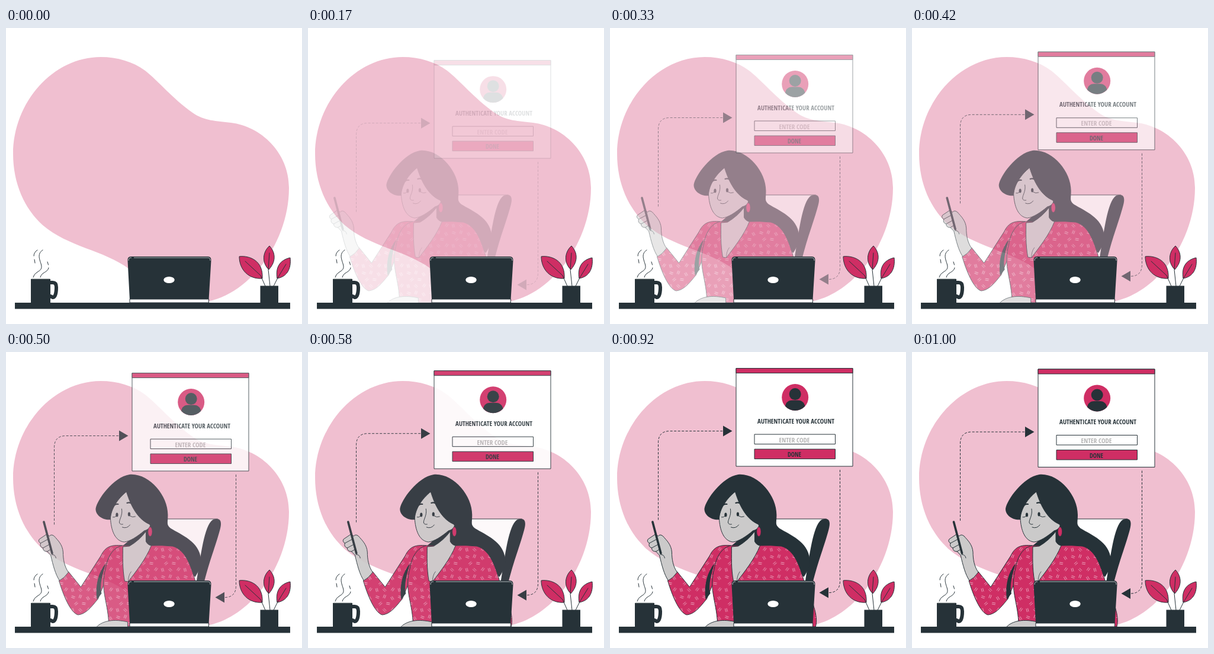
An HTML page for the animation above (1040 ms loop, 500x500 px).

```html
<!DOCTYPE html>
<html lang="en">
<head>
<meta charset="utf-8">
<title>Authenticate your account</title>
<style>
html, body { margin: 0; height: 100%; overflow: hidden; background: #fff }
svg { display: block; width: 100%; height: 100% }
.line { fill: none; stroke: #263238; stroke-linecap: round; stroke-linejoin: round }
.dark { fill: #263238 }
.pink, .skin, .white { stroke: #263238; stroke-linejoin: round }
.pink { fill: #cf2e64 }
.skin { fill: #cbcaca }
.white { fill: #fff }
.dash { fill: none; stroke: #263238; stroke-dasharray: 4 2.5 }
text {
  font: 14px "Open Sans Condensed", "Roboto Condensed", "Open Sans", Roboto, sans-serif;
  font-stretch: extra-condensed;
  text-anchor: middle;
  dominant-baseline: central;
}
</style>
</head>
<body>
<svg viewBox="0 0 500 500">
  <defs>
    <pattern id="print" width="38" height="34" patternUnits="userSpaceOnUse">
      <rect width="38" height="34" fill="#cf2e64"/>
      <g id="ticks" stroke="#efb5c9" stroke-width=".8"/>
    </pattern>
  </defs>

  <path fill="#f0bfd0" d="M160 49C80 49 12 125 12 213C12 262 31 305 62 333C105 370 165 375 208 407C250 440 270 464 320 464C400 464 478 370 478 270C478 210 430 166 380 160C355 157 335 157 315 143C280 118 258 90 235 72C215 57 188 49 160 49Z"/>

  <g id="woman">
    <!-- chair -->
    <path class="white" d="M272 282H364C352 288 345 305 342 325L331 390H272Z"/>
    <path class="dark" d="M363 282C370 282 371 289 368 300C360 330 351 350 341 390H328C334 355 340 300 353 286C356 282 360 282 363 282Z"/>
    <!-- hair -->
    <path class="dark" d="M184 283C172 285 158 277 158 265C160 250 188 211 215 207C248 204 280 242 280 275C280 290 277 291 285 298C303 309 333 320 336 350C337 362 331 372 326 380L270 330L203 328L222 312L200 290Z"/>
    <!-- blouse -->
    <g fill="url(#print)" stroke="#263238" stroke-linejoin="round">
      <path d="M203 327C184 325 174 329 167 344L133 397L112 371L96 386C103 410 115 440 128 444C142 443 152 429 162 417L175 385Z"/>
      <path d="M203 327C188 330 178 345 175 365C165 400 178 420 180 456L215 464H346C351 445 340 420 326 386C318 358 309 334 288 328Q270 326 251 327Z"/>
    </g>
    <path class="dark" d="M175 357C163 372 157 392 160 418L168 408C164 393 170 375 175 357Z"/>
    <path class="skin" d="M159 465C170 453 190 451 212 456V465Z"/>
    <!-- neck and face -->
    <path class="skin" d="M243 303V320Q246 326 252 327C243 350 225 372 213 388L207 387C203 365 204 345 204 329L215 328Q232 318 243 303Z"/>
    <path class="line" stroke-width=".7" d="M213 388Q213 377 218 371"/>
    <path class="skin" d="M210 236C195 248 184 265 183 281C184 300 190 319 206 321C216 320 228 312 240 302C248 300 252 294 249 291C230 283 218 262 210 236Z"/>
    <path class="line" stroke-width="2.2" d="M187 262Q190 256 196 257M211 255Q217 253 221 258"/>
    <path class="line" d="M187 279Q190 280 193 277M216 277Q220 280 225 278M202 265C204 276 198 282 198 288Q199 292 204 291M203 296Q211 299 216 292"/>
    <ellipse class="dark" cx="194" cy="275" rx="2.1" ry="3.6"/>
    <ellipse class="dark" cx="214.5" cy="274" rx="2.1" ry="3.6"/>
    <ellipse class="pink" stroke-width=".6" cx="250" cy="303.5" rx="3.6" ry="8"/>
    <!-- hand and phone -->
    <path class="skin" d="M75 308L63 316Q60 320 65 323Q63 329 69 331Q69 337 76 337L82 343C86 360 90 376 97 386Q105 382 112 372C105 362 103 350 103 338C102 325 94 318 88 311Q83 307 80 311Z"/>
    <path class="line" d="M65 323L78 316M69 331L80 325M76 337L83 333M84 342Q90 342 91 348"/>
    <path class="line" stroke-width="3.6" d="M70.5 287L84.500 340"/>
  </g>

  <g id="panel">
    <path class="dash" d="M81.500 285V155Q81.500 135 101 135H191M388.500 200.500V388Q388.500 408 369 408"/>
    <path class="dark" d="M191 126L206.500 135L191 144ZM369 399L353.500 408L369 417Z"/>
    <rect class="white" x="213" y="29" width="197" height="165.500"/>
    <rect class="pink" x="213" y="29" width="197" height="8"/>
    <circle fill="#cf2e64" cx="312.700" cy="78" r="22.500"/>
    <circle class="dark" cx="312.700" cy="72.500" r="10"/>
    <path class="dark" d="M296 93C297 86 302 83 308 83H317C323 83 328 86 329.400 93A22.500 22.500 0 0 1 296 93Z"/>
    <rect class="white" x="244" y="140.500" width="136.500" height="16.500"/>
    <rect class="pink" x="244" y="165.500" width="136.500" height="16.500"/>
    <text class="dark" x="314" y="117.500" font-weight="700" style="font-weight:700" data-room="130">AUTHENTICATE YOUR ACCOUNT</text>
    <text fill="#b5b5b5" x="311.500" y="149.500" style="font-weight:300" data-room="52">ENTER CODE</text>
    <text class="dark" x="311.500" y="174.500" style="font-weight:300" data-room="23">DONE</text>
  </g>

  <!-- desk and mug -->
  <path class="dark" d="M15 464H480V474.500H15ZM42 424H75V465H42Z"/>
  <path class="line" stroke-width="6" d="M75 430H79Q85 430 85 438C85 448 83 455 79 455L75 453"/>
  <path d="M43 424H74" stroke="#67736f" stroke-width=".8"/>
  <path class="line" d="M62 375C53 381 56 389 59 398C62 407 58 409 52 413Q47 416 46 421M53 375Q47 379 47 385M48 391L49 397M70 395L71.500 400M72 405C71 413 60 412 58 421"/>

  <!-- plant -->
  <path class="dark" d="M429.500 435.500H460V465H429.500Z"/>
  <path class="pink" d="M394 386C410 384 435 392 433 423C410 425 394 408 394 386ZM445 368C456 380 456 395 444 408C433 398 432 380 445 368ZM480 388C482 405 476 420 458 423C455 405 462 392 480 388Z"/>
  <path class="line" d="M404 394L430 418L438 436M445 380L443 408L446 436M473 399L459 422L452 436"/>

  <!-- laptop -->
  <path class="dark" d="M211 386H341Q347 386 346.500 393L342.500 459H209L205.500 393Q205 386 211 386Z"/>
  <path fill="none" stroke="#c4c9cb" stroke-width=".9" d="M207 393Q207 388 211 388H341Q345 388 345 393"/>
  <path class="dark" d="M212 386.500H216V389H212Z"/>
  <rect class="white" x="209" y="458" width="133.500" height="6"/>
  <ellipse cx="275.500" cy="425.500" rx="9.200" ry="5.500" fill="#fff"/>
</svg>
<script>
const get = id => document.getElementById(id);
const woman = get("woman"), panel = get("panel");

// Paired ticks of the blouse print: x, y, angle
get("ticks").innerHTML = [
  [6, 6, 20], [18, 5, 110], [31, 8, 60], [11, 17, 140],
  [24, 17, 10], [5, 28, 75], [18, 28, 45], [32, 27, 125]
].map(([x, y, a]) =>
  `<path transform="translate(${x} ${y}) rotate(${a})" d="M-3-1.300H3M-3 1.300H3"/>`).join("");

// Choose the largest font size that fits each label
for (const label of document.querySelectorAll("text")) {
  const fit = label.dataset.room / label.getComputedTextLength();
  label.style.fontSize = 14 * Math.min(1, fit) + "px";
}

const bezier = (a, b, s) => 3 * a * s * (1 - s) ** 2 + 3 * b * s * s * (1 - s) + s ** 3;

// Ease with a slight overshoot
function ease(x) {
  let low = 0, high = 1;
  for (let i = 0; i < 24; i++) {
    const mid = (low + high) / 2;
    if (bezier(.36, .5, mid) < x) low = mid; else high = mid;
  }
  return bezier(-.01, 1.38, low);
}

function draw(now) {
  // 25 steps at 24 per second; the first two stay empty
  const step = Math.min(24, Math.floor((now % 1040) * .024 + .12));
  const e = ease((step + 1) / 25);
  const opacity = step < 2 ? 0 : Math.min(1, Math.max(0, e));
  const shift = 30 * (1 - e);
  woman.setAttribute("opacity", opacity);
  panel.setAttribute("opacity", opacity);
  woman.setAttribute("transform", `translate(${-shift} 0)`);
  panel.setAttribute("transform", `translate(0 ${shift})`);
}

const start = performance.now();
function tick() {
  draw(performance.now() - start);
  requestAnimationFrame(tick);
}
tick();
</script>
</body>
</html>
```
